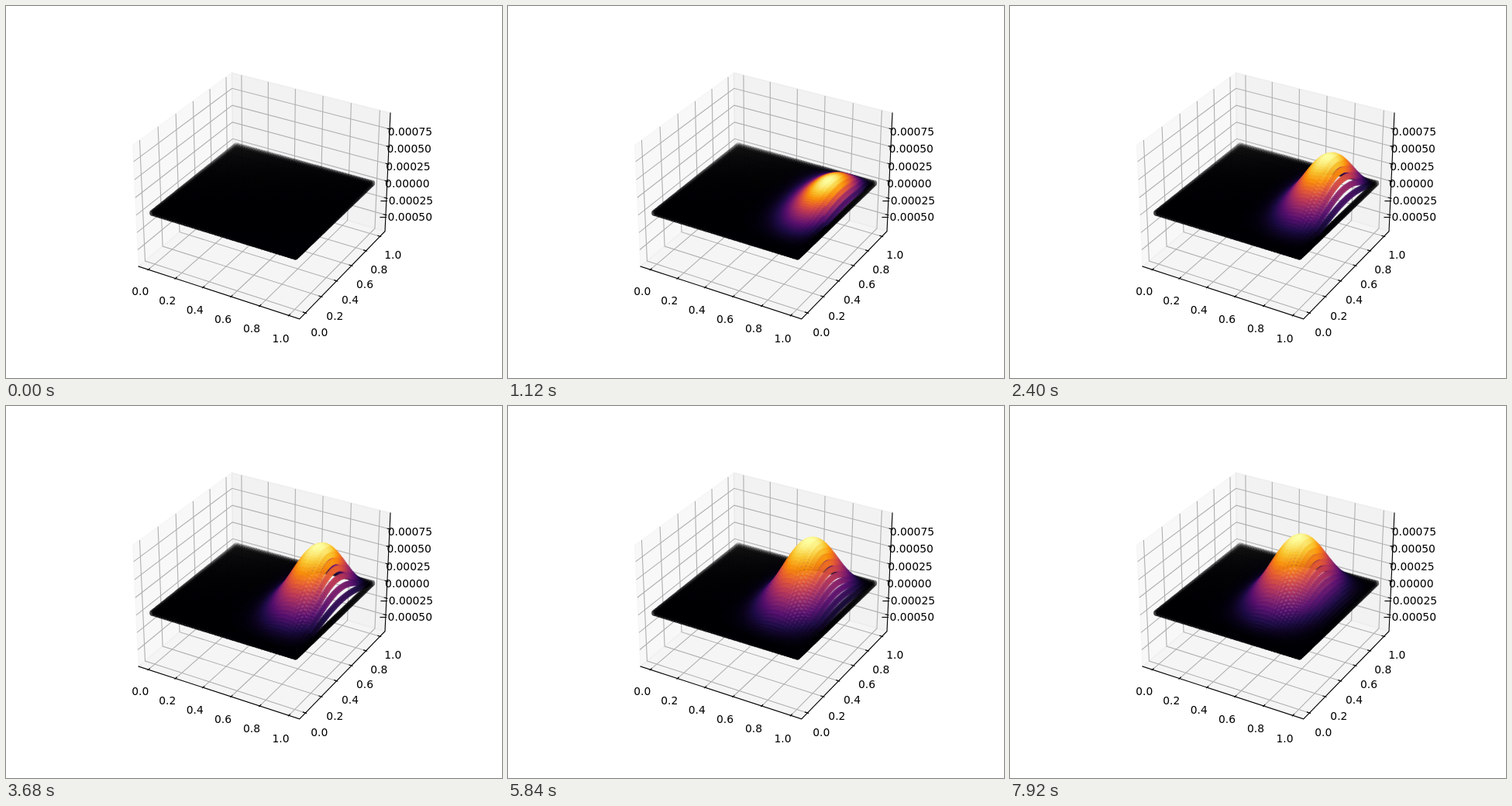
Animation, 640 px wide and 480 px high, one loop 8000 ms. Source, as an HTML page with a canvas:

```html
<!DOCTYPE html>
<html lang="en">
<head>
<meta charset="utf-8">
<title>Surface plot</title>
<style>
html, body { margin: 0; width: 100%; height: 100%; overflow: hidden; background: #fff; }
svg, canvas { position: absolute; left: 0; top: 0; width: 640px; height: 480px; }
text { font: 13.889px "DejaVu Sans", sans-serif; text-anchor: middle; fill: #000; }
path { stroke-width: 1.11; fill: none; }
.grid { stroke: #b0b0b0; }
.axis { stroke: #000; stroke-linecap: square; }
.tick { stroke: #000; }
</style>
</head>
<body>
<svg id="axes" viewBox="0 0 640 480"></svg>
<canvas id="plot" width="640" height="480"></canvas>
<script>
const LOOP = 8000, STEP = 80, N = 51, DOT = 4.1;
const SIDE = 8 / 7, TALL = 6 / 7;           // box edges in view units
const B = SIDE / 2 * 25 / 24, C = TALL / 2 * 25 / 24;   // padded half edges
const Z0 = -0.0592, ZSTEP = 0.1296;         // height of zero, and of 0.00025

// Perspective view from 30 degrees up, 60 degrees to the side
function depth(x, y, z) { return 0.433 * x - 0.75 * y + 0.5 * z; }
function project(x, y, z) {
  const k = 1997.8 / (10 - depth(x, y, z));
  return [333 + k * (0.866 * x + 0.5 * y),
          237.4 - k * (-0.25 * x + 0.433 * y + 0.866 * z)];
}
const flat = v => (v - 0.5) * SIDE / 1.1;

const svg = document.getElementById('axes');
function add(tag, attrs, text) {
  const el = document.createElementNS('http://www.w3.org/2000/svg', tag);
  for (const key in attrs) el.setAttribute(key, attrs[key]);
  if (text) el.textContent = text;
  svg.appendChild(el);
}
function line(cls, ...pts) {
  const d = 'M' + pts.map(p => project(...p).map(v => v.toFixed(2)).join(' ')).join('L');
  add('path', { class: cls, d });
}
function pane(level, ...pts) {
  const c = `rgba(${level},${level},${level},0.5)`;
  add('polygon', {
    points: pts.map(p => project(...p).join()).join(' '),
    fill: c, stroke: c, 'stroke-width': 1.39
  });
}
function label(text, x, y, z) {
  const p = project(x, y, z);
  add('text', { x: p[0].toFixed(1), y: Math.round(p[1] + 11.2) }, text);
}

function drawAxes() {
  const inner = B - 0.019, outer = B + 0.0095;
  const off = B + 0.0988, low = -C - 0.0741;
  const flats = [0, 1, 2, 3, 4, 5].map(i => i / 5);
  const heights = [-2, -1, 0, 1, 2, 3];

  pane(242, [-B, -B, -C], [-B, B, -C], [-B, B, C], [-B, -B, C]);
  pane(230, [-B, B, -C], [B, B, -C], [B, B, C], [-B, B, C]);
  pane(236, [-B, -B, -C], [B, -B, -C], [B, B, -C], [-B, B, -C]);

  for (const v of flats) {
    const p = flat(v);
    line('grid', [p, -B, -C], [p, B, -C], [p, B, C]);
    line('grid', [B, p, -C], [-B, p, -C], [-B, p, C]);
  }
  for (const i of heights) {
    const z = Z0 + i * ZSTEP;
    line('grid', [-B, -B, z], [-B, B, z], [B, B, z]);
  }
  line('axis', [-B, -B, -C], [B, -B, -C], [B, B, -C], [B, B, C]);

  for (const v of flats) {
    const p = flat(v);
    line('tick', [p, -inner, -C], [p, -outer, -C]);
    line('tick', [inner, p, -C], [outer, p, -C]);
    label(v.toFixed(1), p, -off, low);
    label(v.toFixed(1), off, p, low);
  }
  for (const i of heights) {
    const z = Z0 + i * ZSTEP;
    line('tick', [inner, B, z], [outer, B, z]);
    label((i * 0.00025).toFixed(5).replace('-', '\u2212'), off, off, z);
  }
}

const RAMP = [[0, 0, 4], [31, 12, 72], [85, 15, 109], [136, 34, 106], [186, 54, 85],
  [227, 89, 51], [249, 140, 10], [249, 201, 50], [252, 255, 164]];
const COLORS = Array.from({ length: 256 }, (_, i) => {
  const s = i / 255 * 8, k = Math.min(7, Math.floor(s));
  return 'rgb(' + RAMP[k].map((v, j) => Math.round(v + (RAMP[k + 1][j] - v) * (s - k))) + ')';
});

const ctx = document.getElementById('plot').getContext('2d');
const bell = (d, s) => Math.exp(-d * d / (2 * s * s));

function profiles(t) {
  const mix = Math.min(1, t / 4), p = 1.3 - 0.5 * mix, q = 1.1 + 0.3 * mix;
  const a = 0.1 + 0.00894 * t ** 1.6, s = 0.122 + 0.001 * t;
  const xs = [], ys = [];
  for (let i = 0; i < N; i++) {
    const v = i / (N - 1);
    // a bell and its mirror image keep the edge x = 1 at zero
    xs.push(bell(1 - v - a, s) - bell(1 - v + a, s));
    ys.push(Math.max(0, Math.sin(Math.PI * v)) ** q * v ** p);
  }
  const unit = list => { const m = Math.max(...list); return list.map(v => v / m); };
  return [unit(xs), unit(ys)];
}

function drawSurface(t) {
  const [xs, ys] = profiles(t);
  const peak = 0.445 * (1 - Math.exp(-((t / 1.95) ** 1.6))) * (1 - 0.004 * t);
  const dots = [];
  let near = -9, far = 9;
  for (let i = 0; i < N; i++) {
    for (let j = 0; j < N; j++) {
      const u = t > 0 ? xs[i] * ys[j] : 0;
      const x = flat(i / (N - 1)), y = flat(j / (N - 1)), z = Z0 + u * peak;
      const d = depth(x, y, z);
      near = Math.max(near, d);
      far = Math.min(far, d);
      dots.push({ d, u, p: project(x, y, z) });
    }
  }
  dots.sort((m, n) => m.d - n.d);
  ctx.clearRect(0, 0, 640, 480);
  for (const { d, u, p } of dots) {
    ctx.globalAlpha = 0.3 + 0.7 * (d - far) / (near - far);
    ctx.fillStyle = COLORS[Math.max(0, Math.round(u * 255))];
    ctx.beginPath();
    ctx.arc(p[0], p[1], DOT, 0, 7);
    ctx.fill();
  }
}

let shown = -1;
const start = performance.now();
function tick() {
  const now = Math.max(0, performance.now() - start) % LOOP;
  const step = Math.floor(now / STEP);
  if (step !== shown) {
    shown = step;
    drawSurface(step * STEP / 1000);
  }
  requestAnimationFrame(tick);
}
drawAxes();
tick();
</script>
</body>
</html>
```
